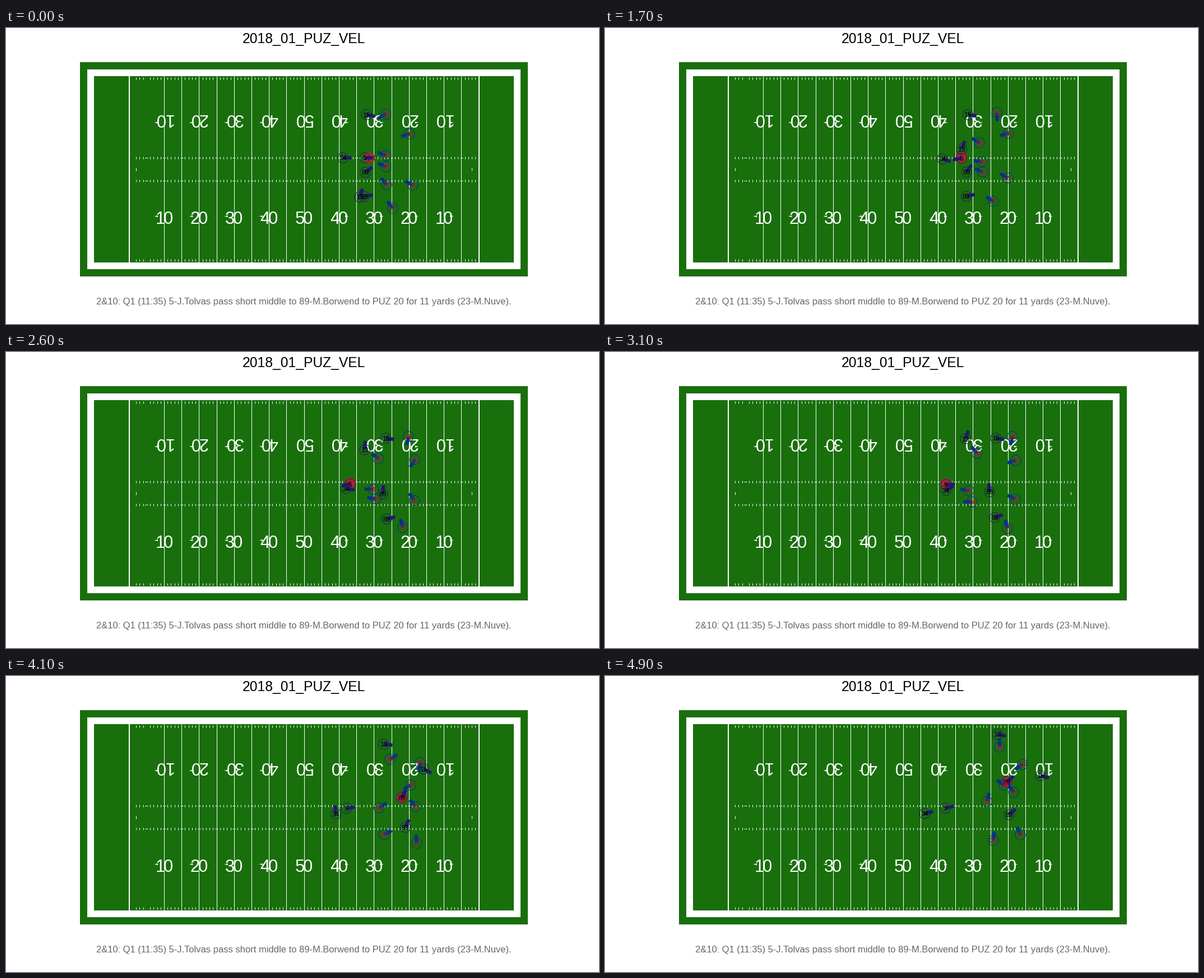
A matplotlib script that plays this animation: 1058 px wide and 529 px high, repeating every 5 s.

```python
import numpy as np
import matplotlib.pyplot as plt
from matplotlib.animation import FuncAnimation
from matplotlib.patches import Circle, Polygon, Rectangle

W, H, DPI = 1058, 529, 64
FRAMES, STEP = 50, 100
PT = 72 / DPI                      # points per pixel
YARD, LEFT, TOP = 6.24, 157.2, 86
BOTTOM = TOP + 53.33 * YARD
HASHES = (BOTTOM - 29.97 * YARD, BOTTOM - 23.36 * YARD)
GRASS = "#196f0c"

SNAP, THROW, CATCH, END = 13, 33, 40, FRAMES - 1
SPOT = np.array([648, 232])
READY = 0.7                        # pull towards facing upfield, pixels per frame

plt.rcParams["font.family"] = "Liberation Sans"
fig = plt.figure(figsize=(W / DPI, H / DPI), dpi=DPI, facecolor="white")
ax = fig.add_axes([0, 0, 1, 1])
ax.set_xlim(0, W)
ax.set_ylim(H, 0)
ax.axis("off")


def label(x, y, s, px, color, z=3, rotation=0):
    return ax.text(x, y, s, size=px * PT, color=color, ha="center", va="baseline",
                   rotation=rotation, rotation_mode="anchor", zorder=z)


def yard_x(yard):
    return LEFT + yard * YARD


def vlines(yards, y0, y1, px=1):
    ax.vlines([yard_x(y) for y in yards], y0, y1, color="white", lw=px * PT, zorder=2)


def draw_field():
    for margin, color in ((4, GRASS), (2, "white"), (0, GRASS)):
        m = margin * YARD
        ax.add_patch(Rectangle((LEFT - m, TOP - m), 120 * YARD + 2 * m,
                               BOTTOM - TOP + 2 * m, fc=color, ec="none", zorder=1))

    vlines((10, 110), TOP, BOTTOM, 2)
    vlines(range(20, 110, 5), TOP, BOTTOM)
    vlines((12, 108), 249.5, 255)
    for y in (TOP + 3.5, *HASHES, BOTTOM - 3.5):
        vlines([yard for yard in range(12, 110) if yard % 5], y - 2, y + 2)
    for y in HASHES:
        for yard in range(15, 110, 5):
            x = yard_x(yard)
            ax.hlines(y, x - 2.5, x + 2.5, color="white", lw=PT, zorder=2)

    for yard in range(20, 110, 10):
        x, way = yard_x(yard), np.sign(yard - 60)
        tens = str(5 - abs(yard - 60) // 10)
        for base, turn, side in ((350, 0, 1), (154, 180, -1)):
            label(x - 7 * side, base, tens, 31, "white", rotation=turn)
            label(x + 7 * side, base, "0", 31, "white", rotation=turn)
            if way:
                y = base - 13.5 if side > 0 else base + 15
                tip = [(x + 17.5 * way, y), (x + 11 * way, y - 1.5), (x + 11 * way, y + 1.5)]
                ax.add_patch(Polygon(tip, fc="white", ec="none", zorder=3))


def slopes(ts, ps):
    """Tangents that never overshoot; a route that waits for the snap starts at rest."""
    d = np.diff(ps, axis=0) / np.diff(ts)[:, None]
    a, b = d[:-1], d[1:]
    ab = a * b
    inner = np.where(ab > 0, 2 * ab / np.where(ab > 0, a + b, 1), 0)
    first = d[:1] * (ts[0] == 0)
    return np.vstack([first, inner, d[-1:] / 2])


def unit(v):
    return v / (np.hypot(*v) + 1e-6)


class Player:
    def __init__(self, number, watch, *points):
        """watch: how much the player faces the ball rather than his run."""
        self.watch = watch
        self.ts = np.array(self.times, float)
        self.ps = np.array(points, float)
        self.ms = slopes(self.ts, self.ps)
        self.bar, = ax.plot([], [], color=self.color, lw=6 * PT,
                            solid_capstyle="butt", zorder=6)
        self.ring = ax.add_patch(Circle((0, 0), 9.2, fill=False, ec=self.color,
                                        lw=PT, zorder=7))
        self.text = label(0, 0, str(number), 12.3, self.ink, z=8)

    def at(self, t):
        ts, ps, ms = self.ts, self.ps, self.ms
        t = np.clip(t, ts[0], ts[-1])
        k = min(np.searchsorted(ts, t, side="right"), len(ts) - 1) - 1
        h = ts[k + 1] - ts[k]
        u = (t - ts[k]) / h
        return (ps[k] + (ps[k + 1] - ps[k]) * u * u * (3 - 2 * u)
                + h * u * (1 - u) * (ms[k] * (1 - u) - ms[k + 1] * u))

    def place(self, t, ball):
        p = self.at(t)
        run = self.at(t + 0.5) - self.at(t - 0.5) + (READY * self.upfield, 0)
        to_ball = ball - p
        to_ball = to_ball / max(np.hypot(*to_ball), 20)
        face = unit(self.watch * to_ball + (1 - self.watch) * unit(run))
        tip = p + 15.5 * face
        self.bar.set_data([p[0], tip[0]], [p[1], tip[1]])
        self.ring.center = p
        self.text.set_position(p + (0, 4.5))


class Offense(Player):
    color, ink, upfield = "#241773", "black", 1
    times = (SNAP, 31, END)


class Motion(Offense):
    times = (0, 31, END)


class Defense(Player):
    color, ink, upfield = "#00338d", "#c60c30", -1
    times = (0, 17, 31, END)


draw_field()
label(531, 27, "2018_01_PUZ_VEL", 24.6, "black")
label(531, 494, "2&10: Q1 (11:35) 5-J.Tolvas pass short middle to 89-M.Borwend "
      "to PUZ 20 for 11 yards (23-M.Nuve).", 16.55, "#666666")

passer = Offense(5, 0.5, (640, 232), (608, 237), (607, 236))
catcher = Offense(89, 0.5, (641, 258), (686, 250), (717, 189))
players = [
    passer, catcher,
    Offense(15, 0.15, (643, 155), (697, 154), (777, 178)),
    Offense(34, 0.5, (601, 232), (608, 247), (570, 246)),
    Offense(83, 0.15, (639, 301), (695, 296), (721, 248)),
    Motion(13, 0.4, (631, 302), (643, 155), (700, 104)),
    Defense(28, 0.6, (678, 154), (699, 151), (727, 151), (745, 158)),
    Defense(23, 0.6, (720, 189), (720, 188), (733, 194), (712, 195)),
    Defense(58, 0.3, (678, 228), (668, 205), (664, 181), (704, 127)),
    Defense(49, 0.6, (678, 248), (673, 239), (649, 248), (681, 224)),
    Defense(24, 0.6, (679, 280), (674, 257), (655, 268), (693, 294)),
    Defense(21, 0.6, (726, 281), (719, 268), (732, 263), (729, 208)),
    Defense(27, 0.6, (690, 322), (693, 310), (718, 315), (741, 284)),
]
ball = ax.add_patch(Circle(SPOT, 10, fc="#a52a2a", ec="none", zorder=5))


def ball_at(t):
    """Snapped to the passer, then thrown in a straight line to the catcher."""
    snapped = np.clip((t - SNAP) / 3, 0, 1)
    thrown = np.clip((t - THROW) / (CATCH - THROW), 0, 1)
    held = SPOT + snapped * (passer.at(t) - (0, 1.5) - SPOT)
    return held + thrown * (catcher.at(t) - held)


def update(t):
    ball.center = spot = ball_at(t)
    for p in players:
        p.place(t, spot)
    return []


anim = FuncAnimation(fig, update, frames=FRAMES, interval=STEP, repeat=True, repeat_delay=0)
plt.show()
```
